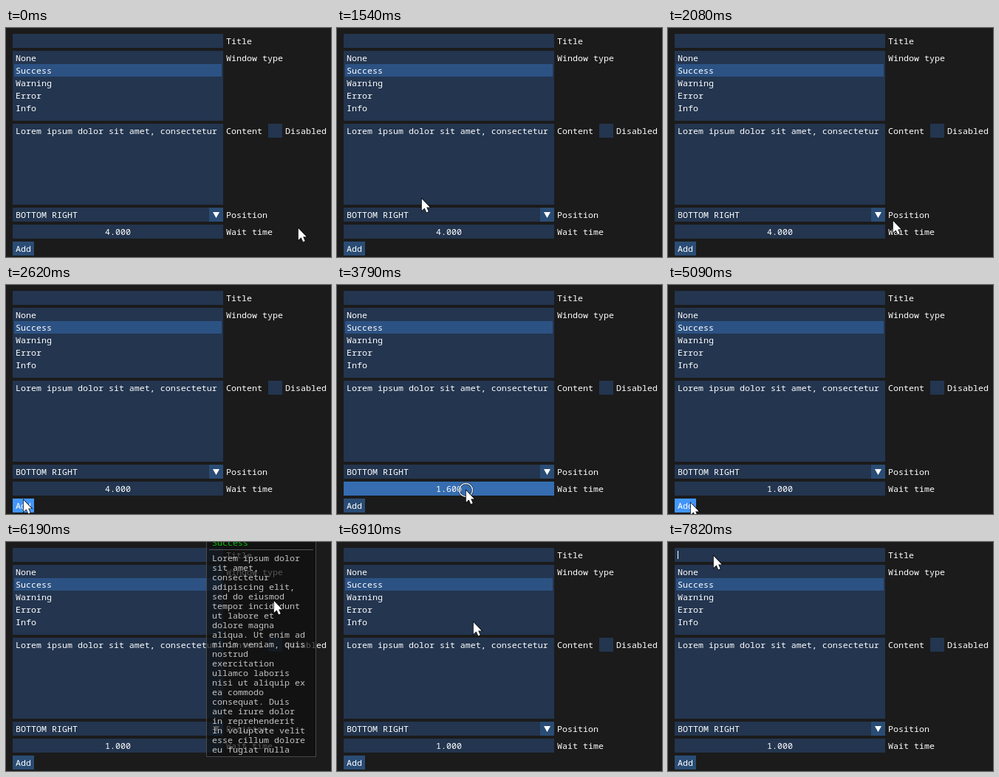
Write an HTML page with a canvas that moves like this. It is 440x311 px and loops after 8000 ms.

```html
<!DOCTYPE html>
<html>
<head>
<meta charset="utf-8">
<style>
html, body { margin: 0; overflow: hidden; background: #1b1b1b; }
canvas { display: block; }
</style>
</head>
<body>
<canvas id="stage" width="440" height="311"></canvas>
<script>
const ctx = document.getElementById('stage').getContext('2d');
const LOOP = 8000, STEP = 90;
const BG = '#1b1b1b', FRAME = '#23354f', HEADER = '#2c5283', BUTTON = '#2a4c74';
const HOT = '#4296fa', PRESSED = '#0f87fa', DRAGGED = '#356db0';

// Mouse moves: start time, number of steps, end point
const moves = [
  [1180, 5, 114, 231], [1630, 2, 150, 149], [1810, 4, 304, 261], [2260, 5, 23, 291],
  [2710, 4, 198, 279], [3070, 5, 174, 278], [4100, 4, 168, 278], [4460, 5, 30, 295],
  [5180, 2, 330, 280], [5830, 5, 362, 79], [6280, 4, 319, 202], [6640, 8, 48, 13],
  [7460, 4, 61, 18]];

const lorem = 'Lorem ipsum dolor sit amet, consectetur adipiscing elit, sed do eiusmod tempor ' +
  'incididunt ut labore et dolore magna aliqua. Ut enim ad minim veniam, quis nostrud ' +
  'exercitation ullamco laboris nisi ut aliquip ex ea commodo consequat. Duis aute irure ' +
  'dolor in reprehenderit in voluptate velit esse cillum dolore eu fugiat nulla pariatur.';
const toastLines = lorem.match(/.{1,19}(?= |$)/g).map(s => s.trim());

const clamp = v => Math.max(0, Math.min(1, v));
const within = (v, a, b) => v >= a && v < b;
const dragging = t => within(t, 3070, 4460);
const clickingAdd = t => within(t, 5000, 5090);
const clickingTitle = t => within(t, 7270, 7460);

function mouseAt(t) {
  let x = 395, y = 271;
  for (const [start, steps, toX, toY] of moves) {
    const k = clamp((Math.floor((t - start) / STEP) + 1) / steps);
    x += (toX - x) * k;
    y += (toY - y) * k;
  }
  return [Math.round(x), Math.round(y)];
}

function box(x, y, w, h, color) {
  ctx.fillStyle = color;
  ctx.fillRect(x, y, w, h);
}

function text(str, x, y, color = '#fff') {
  ctx.fillStyle = color;
  ctx.fillText(str, x, y);
}

function shape(points) {
  ctx.beginPath();
  points.forEach(p => ctx.lineTo(...p));
  ctx.closePath();
}

function drawForm(t, x, y) {
  const onDrag = within(x, 9, 294) && within(y, 267, 286);
  const onAdd = within(x, 9, 38) && within(y, 290, 309);

  box(0, 0, 440, 311, BG);
  box(9, 8, 285, 19, FRAME);
  text('Title', 298, 22);
  if (t >= 7270) box(13, 12, 1, 11, '#fff');

  box(9, 31, 285, 95, FRAME);
  box(11, 49, 281, 17, HEADER);
  ['None', 'Success', 'Warning', 'Error', 'Info'].forEach((s, i) => text(s, 13, 45 + 17 * i));
  text('Window type', 298, 45);

  box(9, 130, 285, 110, FRAME);
  text(lorem.slice(0, 39), 13, 144);
  text('Content', 298, 144);
  box(355, 130, 19, 19, FRAME);
  text('Disabled', 378, 144);

  box(9, 244, 285, 19, FRAME);
  box(275, 244, 19, 19, BUTTON);
  ctx.fillStyle = '#fff';
  shape([[280, 250], [289, 250], [284.5, 258]]);
  ctx.fill();
  text('BOTTOM RIGHT', 13, 258);
  text('Position', 298, 258);

  const value = t < 3070 ? 4 : dragging(t) ? 1 + (x - 168) / 10 : 1;
  box(9, 267, 285, 19, dragging(t) ? DRAGGED : onDrag ? BUTTON : FRAME);
  text(value.toFixed(3), 134, 281);
  text('Wait time', 298, 281);

  box(9, 290, 29, 19, clickingAdd(t) ? PRESSED : onAdd ? HOT : BUTTON);
  text('Add', 13, 304);
}

function drawToast(t) {
  const fade = clamp(Math.min((t - 5150) / 120, (6440 - t) / 150));
  if (!fade) return;
  ctx.save();
  ctx.globalAlpha = fade * 0.75;
  box(271, -5, 149, 297, 'rgba(15,15,15,.94)');
  ctx.strokeStyle = '#585860';
  ctx.strokeRect(271.5, -5.5, 148, 297);
  box(275, 10, 141, 1, '#6e6e78');
  ctx.beginPath();
  ctx.rect(272, 0, 147, 291);
  ctx.clip();
  text('Success', 279, 5, '#0f0');
  toastLines.forEach((s, i) => text(s, 279, 26 + 13 * i));
  ctx.restore();
}

function drawMouse(t, x, y) {
  if (dragging(t) || clickingAdd(t) || clickingTitle(t)) {
    ctx.beginPath();
    ctx.arc(x + 0.5, y + 0.5, 9, 0, 7);
    ctx.strokeStyle = 'rgba(0,0,0,.55)';
    ctx.lineWidth = 3;
    ctx.stroke();
    ctx.strokeStyle = '#f0f0f0';
    ctx.lineWidth = 1.4;
    ctx.stroke();
  }
  ctx.save();
  ctx.translate(x + 0.8, y + 1);
  shape([[0, 0], [0, 16], [3.8, 12.5], [6.4, 18.4], [9, 17.3], [6.4, 11.4], [11, 11.4]]);
  ctx.strokeStyle = '#000';
  ctx.lineWidth = 1.4;
  ctx.stroke();
  ctx.fillStyle = '#fff';
  ctx.fill();
  ctx.restore();
}

function draw(t) {
  const [x, y] = mouseAt(t);
  ctx.font = '11.667px "Noto Sans Mono", monospace';
  ctx.lineWidth = 1;
  drawForm(t, x, y);
  drawToast(t);
  drawMouse(t, x, y);
}

const begin = performance.now();
function tick() {
  draw((performance.now() - begin) % LOOP);
  requestAnimationFrame(tick);
}
tick();
</script>
</body>
</html>
```
